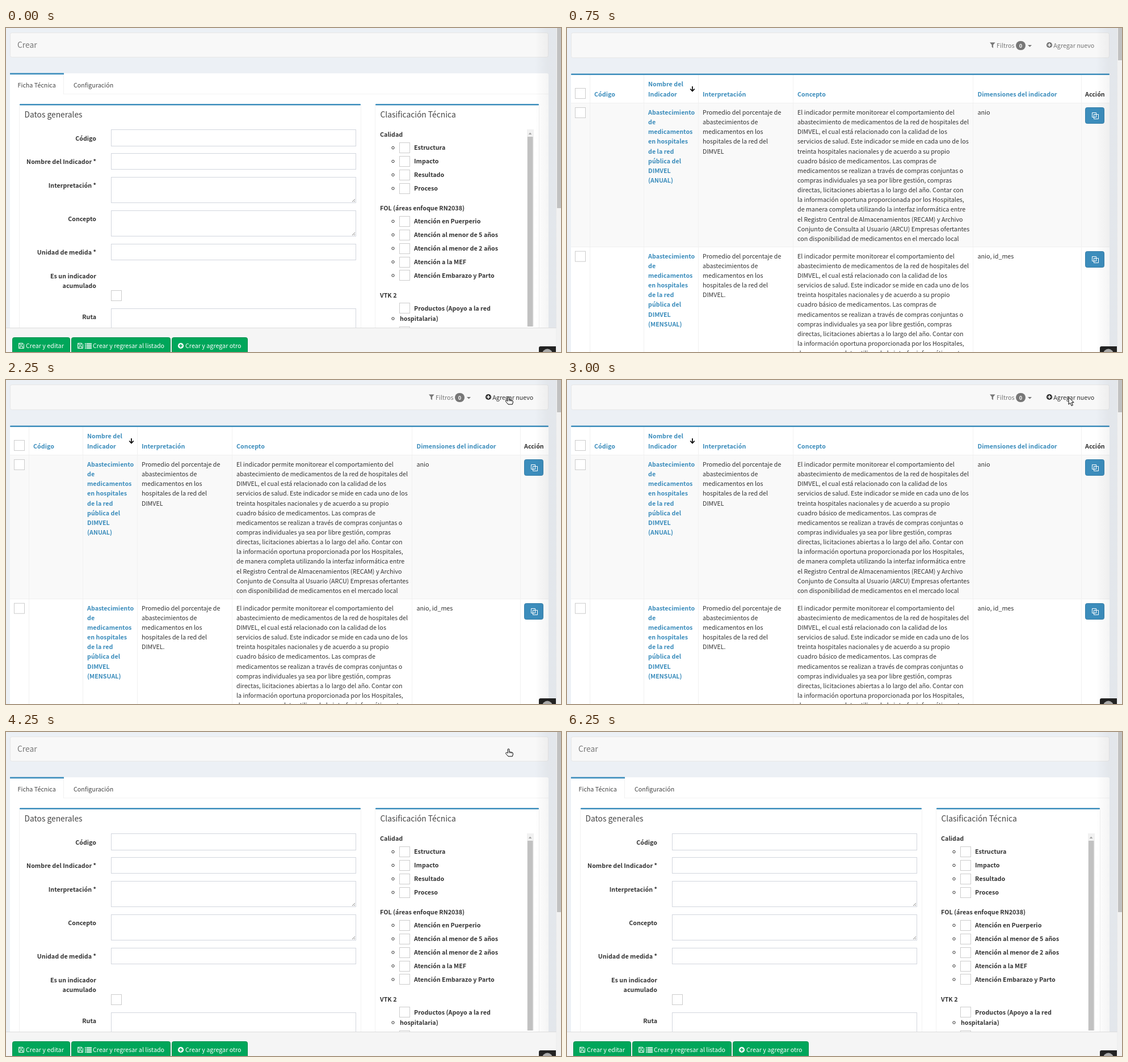
An HTML page that plays this animation: 978 by 572 pixels, repeating every 8000 ms.

```html
<!DOCTYPE html>
<html lang="es">
<head>
<meta charset="utf-8">
<title>Indicadores</title>
<style>
  html, body { margin: 0; width: 100%; height: 100%; overflow: hidden; background: #ecf0f5; }
  svg { display: block; width: 978px; height: 572px; }
  text { font-family: "Noto Sans CJK JP", "Noto Sans CJK SC", "Noto Sans CJK KR", "Noto Sans CJK TC", "Noto Sans CJK", sans-serif; }
</style>
</head>
<body>
<svg id="stage" viewBox="0 0 978 572" xmlns="http://www.w3.org/2000/svg"></svg>
<script>
const LOOP = 8000;
const LINE = 17.14;
const EM = 0.895; // the CJK family draws its Latin letters large
const BLUE = '#3c8dbc', GRAY = '#777', INK = '#333', RULE = '#f1f1f1', FIELD = '#d2d6de';

// --- drawing helpers, each returns SVG markup ---
const rect = (x, y, w, h, fill, more = '') =>
  `<rect x="${x}" y="${y}" width="${w}" height="${h}" fill="${fill}" ${more}/>`;
const path = (d, fill, more = '') => `<path d="${d}" fill="${fill}" ${more}/>`;
const frame = (x, y, w, h, line = FIELD, fill = '#fff', r = 0) =>
  rect(x + .5, y + .5, w - 1, h - 1, fill, `stroke="${line}" rx="${r}"`);
const text = (s, x, y, { size = 12, fill = INK, bold = false, anchor = 'start' } = {}) =>
  `<text x="${x}" y="${y}" font-size="${(size * EM).toFixed(2)}" fill="${fill}"` +
  ` font-weight="${bold ? 700 : 400}" text-anchor="${anchor}">${s}</text>`;
const bold = (s, x, y, more) => text(s, x, y, { bold: true, ...more });
const lines = (s, x, y, more) =>
  s.split('|').map((row, i) => text(row, x, +(y + i * LINE).toFixed(2), more)).join('');
const vline = (x, y, h, fill = RULE) => rect(x, y, 1, h, fill);
const hline = (x, y, w, fill = RULE) => rect(x, y, w, 1, fill);
const tick = (x, y) => frame(x, y, 19, 19, '#ccc');

// --- icons ---
const plus = (x, y, fill, cross) =>
  `<circle cx="${x}" cy="${y}" r="5.1" fill="${fill}"/>` +
  path(`M${x - 3} ${y}h6M${x} ${y - 3}v6`, 'none', `stroke="${cross}" stroke-width="1.7"`);
const floppy = (x, y) =>
  path(`M${x + .5} ${y + .5}h7l2 2v7h-9z`, 'none', 'stroke="#fff"') +
  path(`M${x + 2.5} ${y + .5}v3h4v-3M${x + 2.5} ${y + 9.5}v-3.5h5v3.5`, 'none', 'stroke="#fff"');
const listIcon = (x, y) => [0, 2.7, 5.4, 8.1].map(dy =>
  rect(x, y + dy, 1.7, 1.6, '#fff') + rect(x + 2.6, y + dy, 9.4, 1.6, '#fff')).join('');
const funnel = x => path(`M${x} 25.5h9.6l-3.6 4.3v5.6l-2.4-1.8v-3.8z`, GRAY);
const caret = y => path(`M812 ${y}h7l-3.5 3.6z`, GRAY);

// --- shared page parts ---
const backdrop = thumb =>
  rect(0, 0, 978, 572, '#ecf0f5') +
  rect(969.5, 0, 8.5, 572, '#f1f1f1') + rect(971, 0, 7, thumb, '#c1c1c1');
const topBar = h => frame(7, 8, 949, h, '#e7e7e7', '#f8f8f8', 3);
const shade = rect(932, 0, 38, 572, 'url(#shade)');
const chip =
  path('M939 572v-7q0-3 3-3h27v10z', '#222') +
  '<circle cx="954" cy="575.5" r="9" fill="#aaa"/>';

// --- form page ---
function formPage() {
  const label = (s, y) => bold(s, 159, y, { anchor: 'end' });
  const input = (y, h) => frame(185, y, 432, h);
  const area = (y, h) => input(y, h) +
    path(`M610 ${y + h - 2}l5-5M613 ${y + h - 2}l2-2`, 'none', 'stroke="#777" stroke-width=".9"');
  const box = (x, w, title) =>
    rect(x - .5, 135, w + 1, 396, '#fff', `stroke="${RULE}" rx="3"`) +
    rect(x, 134, w, 2.6, BLUE, 'rx="1.3"') +
    text(title, x + 8.5, 158, { size: 15.43, fill: '#444' });
  const bullet = y => `<circle cx="682" cy="${y}" r="2.2" fill="none" stroke="#333"/>`;
  const option = (s, i, top) => {
    const y = top + i * 23.9;
    return bullet(y + .5) + tick(693, Math.round(y - 9)) + bold(s, 719, y + 4.4);
  };
  const button = (x, w) => frame(x, 546, w, 30, '#008d4c', '#00a65a', 3);
  const caption = (s, x) => text(s, x, 565, { fill: '#fff' });

  return backdrop(318) + topBar(44) +
    text('Crear', 20, 35, { size: 15.43, fill: GRAY }) +
    rect(7, 80, 949, 460, '#fff', 'rx="3"') +
    hline(102, 116, 854, '#f4f4f4') + vline(101, 82, 35, '#f0f0f0') +
    rect(7, 79.5, 95, 2.6, BLUE) +
    text('Ficha Técnica', 20.5, 104.5, { fill: '#444' }) +
    text('Configuración', 119, 104.5, { fill: '#444' }) +

    box(24, 601, 'Datos generales') +
    label('Código', 198.5) + input(179, 30) +
    label('Nombre del Indicador *', 240) + input(221, 29) +
    label('Interpretación *', 282) + area(263, 46) +
    label('Concepto', 341) + area(322, 46) +
    label('Unidad de medida *', 399.5) + input(381, 29) +
    label('Es un indicador', 441.5) + label('acumulado', 458.6) + tick(185, 463) +
    label('Ruta', 514) + input(495, 46) +

    box(651, 288, 'Clasificación Técnica') +
    bold('Calidad', 659, 192) +
    ['Estructura', 'Impacto', 'Resultado', 'Proceso']
      .map((s, i) => option(s, i, 211)).join('') +
    bold('FOL (áreas enfoque RN2038)', 659, 322) +
    ['Atención en Puerperio', 'Atención al menor de 5 años', 'Atención al menor de 2 años',
      'Atención a la MEF', 'Atención Embarazo y Parto']
      .map((s, i) => option(s, i, 340.8)).join('') +
    bold('VTK 2', 659, 475.8) +
    tick(693, 485) + bold('Productos (Apoyo a la red', 719, 499) +
    bullet(513) + bold('hospitalaria)', 694, 516.5) + tick(693, 527) +
    rect(918, 179, 12, 348, '#f1f1f1') + rect(919, 192, 9.5, 335, '#c1c1c1') +
    path('M920.8 188h5.6l-2.8-3.4z', '#a3a3a3') +

    shade +
    rect(0, 530, 969.5, 42, '#f5f5f5') + hline(0, 529, 969.5, '#ddd') +
    button(11, 102) + floppy(22, 556) + caption('Crear y editar', 35) +
    button(115, 175) + floppy(126, 556) + listIcon(139, 556.5) +
    caption('Crear y regresar al listado', 153) +
    button(292, 134) + plus(308, 561, '#fff', '#00a65a') + caption('Crear y agregar otro', 316) +
    chip;
}

// --- table page, before and after its widgets are styled ---
const NAME = 'Abastecimiento|de|medicamentos|en hospitales|de la red|pública del|DIMVEL|';
const MEANING = 'Promedio del porcentaje de|abastecimientos de|medicamentos en los|hospitales de la red del|DIMVEL';
const INTRO = 'El indicador permite monitorear el comportamiento del|' +
  'abastecimiento de medicamentos de la red de hospitales del|' +
  'DIMVEL, el cual está relacionado con la calidad de los|' +
  'servicios de salud. Este indicador se mide en cada uno de los|';
const OUTRO = 'Registro Central de Almacenamientos (RECAM) y Archivo|' +
  'Conjunto de Consulta al Usuario (ARCU) Empresas ofertantes|' +
  'con disponibilidad de medicamentos en el mercado local';
const RAW = {
  dy: 0, cols: [32, 127, 224, 392, 714, 906], at: [40, 135, 231.5, 400, 722],
  concept: INTRO + 'treinta hospitales nacionales y de acuerdo a su propio cuadro|' +
    'básico de medicamentos. Las compras de medicamentos se|' +
    'realizan a través de compras conjuntas o compras|' +
    'individuales ya sea por libre gestión, compras directas,|' +
    'licitaciones abiertas a lo largo del año. Contar con la|' +
    'información oportuna proporcionada por los Hospitales, de|' +
    'manera completa utilizando la interfaz informática entre el|' + OUTRO
};
const STYLED = {
  dy: 1, cols: [40, 135, 231, 398, 715, 906], at: [48, 143, 239, 406, 723.5],
  concept: INTRO + 'treinta hospitales nacionales y de acuerdo a su propio|' +
    'cuadro básico de medicamentos. Las compras de|' +
    'medicamentos se realizan a través de compras conjuntas o|' +
    'compras individuales ya sea por libre gestión, compras|' +
    'directas, licitaciones abiertas a lo largo del año. Contar con|' +
    'la información oportuna proporcionada por los Hospitales,|' +
    'de manera completa utilizando la interfaz informática entre|el ' + OUTRO
};

function tablePage({ dy, cols, at, concept }) {
  const styled = dy > 0;
  const [code, name, meaning, idea, dims] = at;
  const head = { fill: BLUE, bold: true };
  const box = y => styled ? tick(14, y - 8)
    : rect(14.5, y - 4.5, 10, 10, '#e4e4e4', 'stroke="#a9a9a9" rx="2"');
  const row = (top, period, end, dimText) =>
    box(top + 16.5 - dy * .5) +
    lines(NAME + `(${period})`, name, top + 21, head) +
    lines(MEANING + end, meaning, top + 21) +
    lines(concept, idea, top + 21) +
    text(dimText, dims, top + 21) +
    frame(913, Math.round(top + 8), 34, 29, '#367fa9', BLUE, 3) +
    path(`M925.5 ${Math.round(top) + 17.5}h7v8h-7zM928.5 ${Math.round(top) + 20.5}h8v8h-8z`,
      BLUE, 'stroke="#fff" stroke-linejoin="round"');
  const top = 131 + dy, next = top + 253.7, base = 119.5 + dy;
  const arrowX = name + 78;

  return backdrop(57) + topBar(44 + dy) +
    funnel(styled ? 745 : 765) +
    text('Filtros', styled ? 757 : 776, 34 + dy * .5, { fill: GRAY }) +
    (styled ? rect(791, 23, 17, 16, GRAY, 'rx="8"') +
      bold('0', 799.5, 35, { size: 10.3, fill: '#fff', anchor: 'middle' }) : '') +
    caret(29.5 + dy * .5) +
    `<g class="add">${plus(850, 30, GRAY, '#f8f8f8')}${text('Agregar nuevo', 857.3, 34 + dy * .5, { fill: GRAY })}</g>` +
    (styled ? `<g class="hover">${plus(850, 30, INK, '#f8f8f8')}${text('Agregar nuevo', 857.3, 34.5)}</g>` : '') +

    rect(7, 80 + dy, 949, 500, '#fff', 'rx="3"') +
    rect(7, 79.5 + dy, 949, 2.6, BLUE, 'rx="1.3"') +
    rect(7, top, 949, 254, '#f9f9f9') +
    hline(7, top, 949, '#f0f0f0') + hline(7, top + 254, 949, '#f0f0f0') +
    cols.map(x => vline(x, 82 + dy, 490)).join('') +

    box(113.5 - dy * .5 + dy) +
    text('Código', code, base, head) +
    lines('Nombre del|Indicador', name, base - LINE, head) +
    path(`M${arrowX} ${102 + dy}v8.5M${arrowX - 3.8} ${106.5 + dy}l3.8 4l3.8-4`, 'none',
      'stroke="#000" stroke-width="1.7"') +
    text('Interpretación', meaning, base, head) +
    text('Concepto', idea, base, head) +
    text('Dimensiones del indicador', dims, base, head) +
    bold('Acción', 913, base) +
    row(top, 'ANUAL', '', 'anio') +
    row(next, 'MENSUAL', '.', 'anio, id_mes') +
    (styled ? shade + chip : '');
}

// --- pointers ---
const ARROW = path('M.5.5V13.2L3.4 10.5L5.5 15.5L7.8 14.5L5.7 9.7H9.6Z', '#fff',
  'stroke="#000" stroke-linejoin="round"');
const HAND = path('M4.2 8.2V2a1.3 1.3 0 0 1 2.6 0V6L12 7.1a1.6 1.6 0 0 1 1.3 1.6V11L12.3 14H5L.9 9.3a1.2 1.2 0 0 1 1.8-1.6Z', '#fff',
  'stroke="#000" stroke-linejoin="round"') +
  path('M6.8 6v2.6M9 6.6v2.2M11.1 7.1v2', 'none', 'stroke="#000" stroke-width=".7"');

const layer = (id, body) => `<g id="${id}" visibility="hidden">${body}</g>`;
const stage = document.getElementById('stage');
stage.innerHTML =
  '<defs><linearGradient id="shade"><stop stop-opacity="0"/>' +
  '<stop offset=".6" stop-opacity=".04"/><stop offset="1" stop-opacity=".04"/></linearGradient></defs>' +
  layer('form', formPage()) + layer('raw', tablePage(RAW)) + layer('table', tablePage(STYLED)) +
  layer('dark', rect(0, 0, 978, 572, '#242c32')) + layer('arrow', ARROW) + layer('hand', HAND);

// --- timeline: every change is a hard step ---
const PAGES = [[0, 'form'], [500, 'raw'], [750, 'table'], [4000, 'dark'], [4250, 'form']];
const POINTER = [
  [0, ''], [1250, 'hand', .5, 213], [1500, 'arrow', 695.5, 74], [1750, 'hand', 872, 42.5],
  [2000, 'hand', 890, 29], [2250, 'hand', 880, 29], [3000, 'arrow', 883.5, 30],
  [4250, 'hand', 880, 29], [5500, 'arrow', 475.5, 113.5], [5750, 'arrow', 285.5, 166.5], [6250, '']
];
const HOVER_AT = 1750;

const byId = id => document.getElementById(id);
const stepAt = (steps, t) => steps.filter(s => s[0] <= t).pop();
const setShown = (el, on) => el.setAttribute('display', on ? 'inline' : 'none');
const layers = ['form', 'raw', 'table', 'dark', 'arrow', 'hand'].map(byId);
layers.forEach(el => el.removeAttribute('visibility'));
const plain = document.querySelector('#table .add');
const hovered = document.querySelector('#table .hover');

function draw(now) {
  const t = now % LOOP;
  const page = stepAt(PAGES, t)[1];
  const [, shape, x, y] = stepAt(POINTER, t);
  layers.forEach(el => setShown(el, el.id === page || el.id === shape));
  if (shape) byId(shape).setAttribute('transform', `translate(${x} ${y})`);
  setShown(plain, t < HOVER_AT);
  setShown(hovered, t >= HOVER_AT);
}

const start = performance.now();
function tickFrame() {
  draw(performance.now() - start);
  requestAnimationFrame(tickFrame);
}
tickFrame();
</script>
</body>
</html>
```
